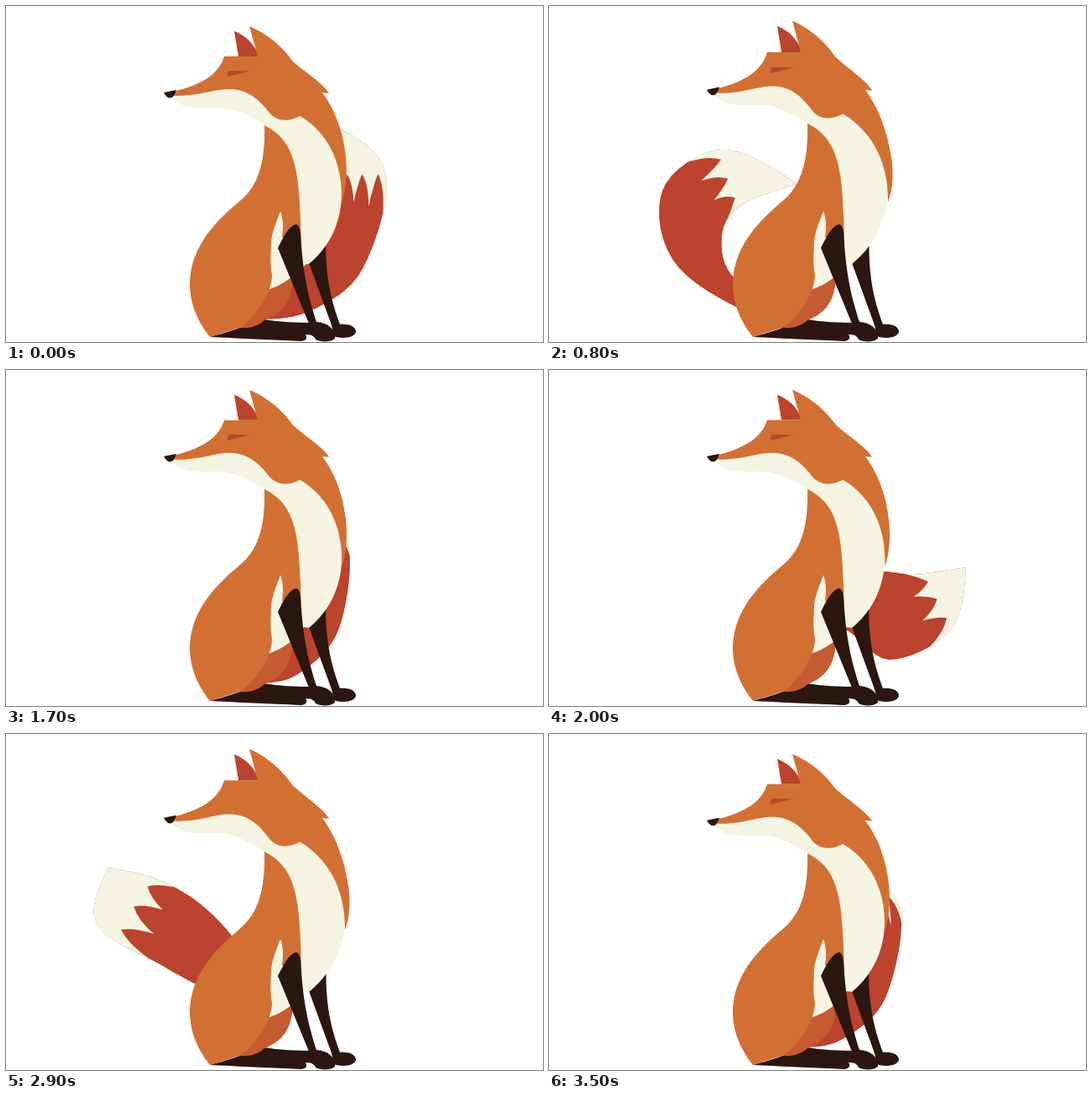
These frames come from a looping animation (640x400 px, 3.55 s). An HTML page:

```html
<!DOCTYPE html>
<html lang="en">
<head>
<meta charset="utf-8">
<title>Fox</title>
<style>
  html, body { margin: 0; width: 100%; height: 100%; overflow: hidden; background: #fff; }
  svg { display: block; width: 100vw; height: 100vh; }
</style>
</head>
<body>
<svg id="stage" viewBox="0 0 640 400"></svg>
<script>
const ORANGE = '#d27034', RED = '#bc432d', CREAM = '#f5f4e2', DARK = '#2c1610', SHADE = '#c65a31';
const LOOP = 3550, SWING = LOOP / 2, STEP = 50;

// Tail poses: left edge, tip, right edge (back to the base), then where the cream starts on each edge
const poses = [
  [0,    345,320, 380,280, 398,215, 390,142, 453,200, 425,313, 365,362, 3, 2.8],
  [225,  320,280, 385,242, 435,243, 497,235, 478,310, 405,345, 345,308, 3, 2.85],
  [425,  215,345, 230,235, 335,185, 437,225, 375,258, 330,275, 300,330, 3, 3],
  [625,  185,345, 172,232, 262,178, 340,215, 290,238, 250,290, 265,340, 3.15, 2.9],
  [800,  155,312, 135,220, 205,171, 296,212, 228,238, 206,275, 222,325, 2.75, 2.75],
  [1125, 255,320, 190,278, 109,228, 122,159, 188,176, 245,214, 285,270, 2.45, 3],
  [1350, 265,340, 290,270, 248,237, 158,207, 250,156, 345,215, 352,325, 3, 2.7],
  [1725, 330,320, 355,280, 385,225, 345,160, 417,203, 402,312, 352,362, 3, 3]
];
const baseA = [280, 385], baseB = [305, 373];

// Body parts, back to front
const parts = [
  [DARK, 'M361,306 L381,282 C381,325 388,352 398,379 C410,378 417,382 417,388 C415,395 404,396 393,394 C390,392 390,388 388,380 Z'],
  [DARK, 'M243,394 C262,389 276,384 284,381 L307,373 C325,376 345,377 362,377 L368,392 L357,391 C360,396 357,399 350,399 C310,397 280,396 243,394 Z'],
  [SHADE, 'M280,383 C292,384 302,380 308,374 C330,366 341,350 342,323 L312,330 Z'],
  [CREAM, 'M308,142 L300,110 L350,125 C382,148 400,180 400,222 C400,262 382,290 361,307 L355,306 C345,321 332,331 312,338 L318,250 Z'],
  [ORANGE, 'M308,142 C309,180 303,212 280,231 C245,260 219,290 219,333 C220,360 232,380 243,394 L281,382 C302,364 317,340 317,320 C314,305 316,290 316,280 C318,265 323,256 327,244 C330,252 331,262 329,275 L352,290 C350,200 348,162 308,142 Z'],
  [DARK, 'M324,288 C330,276 337,262 345,260 C351,260 351,270 352,285 C355,325 362,352 370,376 C385,377 393,386 392,396 C386,401 374,400 369,397 C367,391 358,391 358,386 L361,378 Z'],
  [ORANGE, 'M345,128 C380,146 402,182 400,234 C405,220 407,200 405,180 C402,150 392,122 376,102 Z'],
  [CREAM, 'M196,107 C210,126 238,120 255,121 C275,123 293,132 308,142 L350,140 L320,90 L240,90 Z'],
  [RED, 'M272,30 C285,35 297,45 301,60 L277,60 Z'],
  [ORANGE, 'M290,24 C313,34 329,48 342,66 C358,80 378,92 385,104 L376,103 L368,118 L350,131 C338,138 322,138 313,126 C297,105 282,99 266,99 C245,99 235,107 201,107 L203,101 C230,94 253,83 260,60 L300,60 Z'],
  [DARK, 'M188,103 L203,100 C202,106 198,111 193,109 Q190,107 188,103 Z']
];

const svg = document.getElementById('stage');
const addPath = fill => {
  const p = document.createElementNS('http://www.w3.org/2000/svg', 'path');
  p.setAttribute('fill', fill);
  return svg.appendChild(p);
};
const clamp = v => Math.max(0, Math.min(1, v));
const mix = (a, b, k) => a + (b - a) * k;
const mixPt = (p, q, k) => [mix(p[0], q[0], k), mix(p[1], q[1], k)];
const str = p => p[0].toFixed(2) + ',' + p[1].toFixed(2);

function hermite(a, b, ma, mb, k) {
  const k2 = k * k, k3 = k2 * k;
  return a * (2 * k3 - 3 * k2 + 1) + ma * (k3 - 2 * k2 + k) + b * (3 * k2 - 2 * k3) + mb * (k3 - k2);
}

// Smooth periodic blend of the poses
function poseAt(ph) {
  const n = poses.length;
  const key = i => poses[(i + n) % n];
  const when = i => key(i)[0] + Math.floor(i / n) * SWING;
  let i = n - 1;
  while (poses[i][0] > ph) i--;
  const span = when(i + 1) - when(i), k = (ph - when(i)) / span;
  const slope = (j, c) => (key(j + 1)[c] - key(j - 1)[c]) / (when(j + 1) - when(j - 1)) * span;
  return key(i).slice(1).map((v, c) =>
    hermite(v, key(i + 1)[c + 1], slope(i, c + 1), slope(i + 1, c + 1), k));
}

// Point on a curve through five points, u from 0 to 4
function edge(pts, u) {
  const i = Math.min(3, Math.floor(u)), last = pts.length - 1;
  return [0, 1].map(c => {
    const inner = j => (pts[j + 1][c] - pts[j - 1][c]) / 2;
    const d = pts[i + 1][c] - pts[i][c];
    const ma = i > 0 ? inner(i) : (3 * d - inner(1)) / 2;
    const mb = i + 1 < last ? inner(i + 1) : (3 * d - inner(i)) / 2;
    return hermite(pts[i][c], pts[i + 1][c], ma, mb, u - i);
  });
}

function run(pts, from, to) {
  const out = [];
  for (let j = 0; j <= 32; j++) out.push(str(edge(pts, mix(from, to, j / 32))));
  return out.join(' L');
}

function drawTail(ph) {
  const q = poseAt(ph);
  const pt = i => [q[2 * i], q[2 * i + 1]];
  const a = [baseA, pt(0), pt(1), pt(2), pt(3)];
  const b = [baseB, pt(6), pt(5), pt(4), pt(3)];
  const [ua, ub] = q.slice(14);
  const IN = -0.22, OUT = 0.2;
  const at = (v, du) => {
    const u = mix(ua, ub, v) + du;
    return mixPt(edge(a, u), edge(b, u), v);
  };
  tail.setAttribute('d', 'M' + run(a, 0, 4) + ' L' + run(b, 4, 0) + ' Z');

  // Three tufts across the boundary
  let d = 'M' + run(a, ua + IN, 4) + ' L' + run(b, 4, ub + IN);
  for (let i = 3; i > 0; i--) {
    const v = i / 3, mid = v - 1 / 6, end = v - 1 / 3;
    d += ' Q' + str(at(v - 0.05, 0.04)) + ' ' + str(at(mid, OUT));
    d += ' Q' + str(at(mid - 0.12, 0.04)) + ' ' + str(at(end, IN));
  }
  tip.setAttribute('d', d + ' Z');
}

// Breathing: the head rises and the back swells
const warp = (path, b) => path.replace(/([\d.]+),([\d.]+)/g, (_, x, y) => {
  x = +x; y = +y;
  const rise = 7 * Math.pow(Math.max(0, 290 - y) / 266, 1.9);
  const swell = 5 * Math.exp(-Math.pow((y - 215) / 50, 2)) * clamp((x - 340) / 60);
  return str([x + b * swell, y - b * rise]);
});

const tail = addPath(RED), tip = addPath(CREAM);
const body = parts.map(([fill, path]) => [addPath(fill), path]);
const eye = addPath(RED);

function draw(t) {
  const ph = t % SWING;
  const breath = (1 - Math.cos(2 * Math.PI * (ph - 65) / SWING)) / 2;
  drawTail(ph);
  body.forEach(([el, path]) => el.setAttribute('d', warp(path, breath)));

  const open = ph < 1150 ? 1 - clamp((ph - 1000) / 100) : clamp((ph - 1200) / 300);
  const top = 80 - 3 * open, low = 80 + 4 * open;
  eye.setAttribute('d', warp(`M266,${top} L291,${80 - 2.5 * open} L264,${low} Q263,${80} 266,${top} Z`, breath));
}

const start = performance.now();
function tick() {
  const t = (performance.now() - start) % LOOP;
  draw(Math.floor(t / STEP) * STEP);
  requestAnimationFrame(tick);
}
tick();
</script>
</body>
</html>
```
